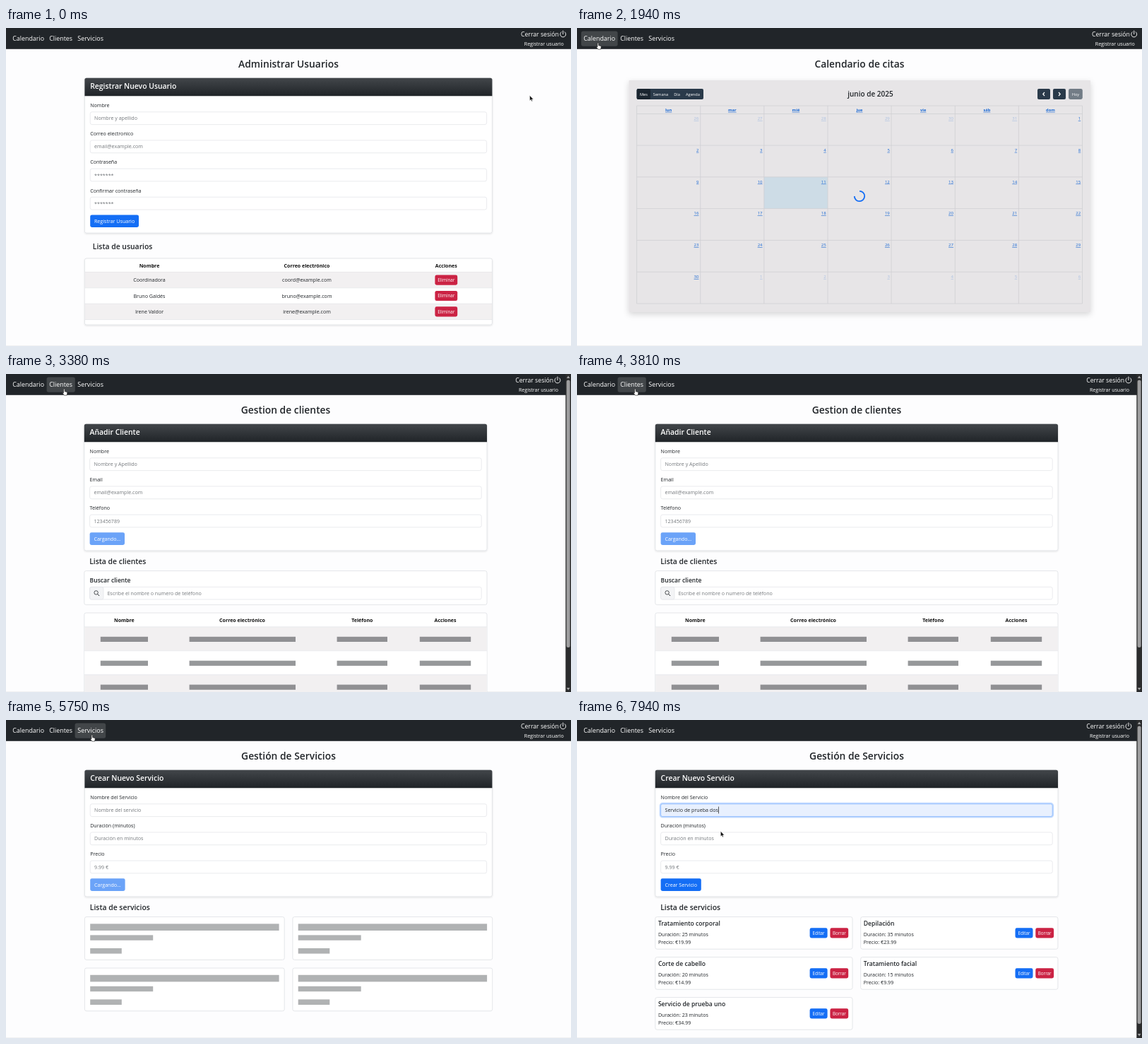
An HTML page that plays this animation: 800 px wide and 450 px high, repeating every 8 s.

```html
<!DOCTYPE html>
<html lang="es">
<head>
<meta charset="utf-8">
<style>
html, body { margin: 0; width: 100%; height: 100%; overflow: hidden; background: #fdfdfe; }
svg { display: block; }
text { font-family: "Open Sans", sans-serif; white-space: pre; }
</style>
</head>
<body>
<svg id="stage" width="800" height="450" viewBox="0 0 800 450"></svg>
<script>
const LOOP = 8000, INK = '#212529', BLUE = '#146ef5', RED = '#cb2344', GREY = '#75797d', LINE = '#dee0e4';
const BODY = 7.1, TITLE = 13.85, SECTION = 10.4;

// y is the middle of the capital letters
const text = (s, x, y, size = BODY, { fill = INK, weight = 400, anchor = 'start', more = '' } = {}) =>
  `<text x="${x}" y="${y + size * .36}" font-size="${size}" fill="${fill}" font-weight="${weight}" text-anchor="${anchor}" ${more}>${s}</text>`;
const rect = (x1, y1, x2, y2, fill, r = 0, more = '') =>
  `<rect x="${x1}" y="${y1}" width="${x2 - x1}" height="${y2 - y1}" rx="${r}" fill="${fill}" ${more}/>`;
const path = (d, stroke, width = 1, more = '') =>
  `<path d="${d}" fill="none" stroke="${stroke}" stroke-width="${width}" ${more}/>`;
const group = (id, body) => `<g id="${id}">${body}</g>`;
const heading = (s, x, y, size = SECTION, anchor = 'start') => text(s, x, y, size, { weight: 600, anchor });
const button = (s, x1, y1, x2, y2, fill, size = BODY) =>
  rect(x1, y1, x2, y2, fill, 2.4) + text(s, (x1 + x2) / 2, (y1 + y2) / 2, size, { fill: '#fff', anchor: 'middle' });
const card = (x1, y1, x2, y2, more = '') => rect(x1, y1, x2, y2, '#fff', 2.6, `stroke="${LINE}" stroke-width=".8" ${more}`);
const input = (x1, y1, x2, y2) => rect(x1, y1, x2, y2, '#fff', 2.6, 'stroke="#e1e3e7" stroke-width=".7"');
const columnHeads = (y, heads) => heads.map(([s, x]) => text(s, x, y, 7.05, { weight: 700, anchor: 'middle', fill: '#111' })).join('');

const edges = scroll => scroll ? [110.8, 681] : [111.4, 688.4];

function nav(scroll) {
  const dx = scroll ? -7.8 : 0, white = { fill: '#fff' };
  return text('Calendario', 9.2, 15, 8.9, white) + text('Clientes', 61.2, 15, 8.9, white) + text('Servicios', 101.2, 15, 9, white) +
    `<g transform="translate(${dx})">` + text('Cerrar sesión', 729, 8.4, 8.7, white) + text('Registrar usuario', 733.8, 22.7, 7.05, white) +
    path('M786.3 5.6a4 4 0 1 0 4.8 0M788.7 4V8.6', '#fff', .9, 'stroke-linecap="round"') + '</g>';
}

function scrollbar(end) {
  return rect(792.3, 0, 800, 450, '#2b2c2d') + rect(793.6, 8.5, 798.6, end, '#9e9e9f', 2.5) +
    '<path d="M793.8 6 796.1 2.4 798.4 6ZM793.8 444 796.1 447.6 798.4 444Z" fill="#a3a3a4"/>';
}

function form(title, head, fields, scroll) {
  const [left, right] = edges(scroll), x = left + 7.8;
  const bottom = 129.3 + fields.length * 40.2;
  return heading(title, (scroll ? 396 : 400), 51, TITLE, 'middle') +
    card(left, 70.8, right, bottom, 'filter="url(#soft)"') +
    `<path d="M${left} 96.2V73.4q0-2.6 2.6-2.6H${right - 2.6}q2.6 0 2.6 2.6V96.2Z" fill="url(#head)"/>` +
    text(head, x, 82.4, SECTION, { fill: '#fff', weight: 600 }) +
    fields.map(([label, hint], i) => {
      const y = 109.6 + i * 40.15;
      return text(label, x, y) + input(x, y + 9.2, right - 7.8, y + 27) +
        text(hint, x + 5.9, y + 18.1, BODY, { fill: GREY, more: i ? '' : 'class="hint"' });
    }).join('');
}

function usersPage() {
  const users = [['Coordinadora', 'coord@example.com'], ['Bruno Galdés', 'bruno@example.com'], ['Irene Valdor', 'irene@example.com']];
  const mid = { anchor: 'middle' };
  return nav() + form('Administrar Usuarios', 'Registrar Nuevo Usuario', [['Nombre', 'Nombre y apellido'],
      ['Correo electronico', 'email@example.com'], ['Contraseña', '*******'], ['Confirmar contraseña', '*******']]) +
    button('Registrar Usuario', 119.2, 264.4, 188, 282, BLUE) + heading('Lista de usuarios', 122.8, 309) +
    card(111.4, 326, 688.4, 420, 'filter="url(#soft)"') +
    columnHeads(336, [['Nombre', 203], ['Correo electrónico', 426], ['Acciones', 623.3]]) +
    users.map(([name, mail], i) => {
      const y = 345.4 + i * 22.4;
      return rect(111.8, y, 688, y + 22.4, i % 2 ? '#fff' : '#f2f0f1') + path(`M111.8 ${y}H688`, LINE, .6) +
        text(name, 203, y + 11.3, BODY, mid) + text(mail, 426, y + 11.3, BODY, mid) +
        button('Eliminar', 607.4, y + 4.1, 639.2, y + 18.3, RED, 6.3);
    }).join('') + path('M111.8 412.6H688', LINE, .6);
}

function calendarPage(loading) {
  const x0 = 84.6, step = 90.13, colX = c => x0 + c * step;
  const rows = loading ? [121.5, 166.1, 210.8, 255.6, 300.4, 345.2, 390] : [121.5, 166.8, 212.4, 258.6, 296, 352.6, 390];
  const line = loading ? '#d0d0d3' : '#e9e2e3', dark = '#2a3a4a';
  const link = { fill: '#1b69d3', anchor: 'end', more: 'text-decoration="underline"' };
  let out = nav() + heading('Calendario de citas', 400, 51, TITLE, 'middle') +
    rect(73.4, 74, 727, 402, loading ? '#e7e5e7' : '#fff', 1, 'filter="url(#lift)"') +
    rect(84.6, 86, 179, 101, dark, 2) + rect(84.6, 86, 104, 101, '#1a252f', 2) +
    [['Mes', 94.4], ['Semana', 118.5], ['Día', 141.5], ['Agenda', 164]].map(([s, x]) =>
      text(s, x, 93.6, 5.7, { fill: '#fff', anchor: 'middle' })).join('') +
    heading('junio de 2025', 415.4, 93.6, 10, 'middle') +
    rect(652, 86, 670, 101, dark, 2) + rect(674, 86, 692, 101, dark, 2) + button('Hoy', 696, 86, 715.8, 101, '#727c86', 5.7) +
    path('M662 91 659.8 93.5 662 96M682 91 684.2 93.5 682 96', '#fff', 1.2) +
    rect(colX(2), rows[2], colX(3), rows[3], loading ? '#cddce6' : '#e4eef7');
  const grid = [110, ...rows].map(y => `M${x0} ${y}H715.5`).join('') +
    Array.from({ length: 8 }, (_, c) => `M${colX(c)} 110V390`).join('');
  out += path(grid, line, .8);
  ['lun', 'mar', 'mié', 'jue', 'vie', 'sáb', 'dom'].forEach((d, c) =>
    out += text(d, colX(c + .5), 115.8, 5.7, { ...link, weight: 700, anchor: 'middle' }));
  for (let i = 0; i < 42; i++) {
    const day = i < 5 ? 26 + i + (i > 5) : i < 6 ? 31 : (i - 6) % 30 + 1;
    const other = i < 6 || i > 35;
    out += text(day, colX(i % 7 + 1) - 2.3, rows[i / 7 | 0] + 6.6, 6, { ...link, more: link.more + (other ? ' opacity=".3"' : '') });
  }
  if (loading) return out + path('M405.1 243.1A7.2 7.2 0 1 1 405.1 232.9', BLUE, 1.8, 'id="spinner"');
  const events = [
    [0, 4, '9:00', 'Corte de cabello', '17:00', 'Servicio de prueba uno'],
    [1, 0, '15:00', 'Tratamiento corporal', '18:00', 'Tratamiento facial, Corte de cabello'],
    [2, 1, '10:00', 'Tratamiento facial'],
    [2, 3, '11:00', 'Depilación', '13:00', 'Tratamiento corporal'],
    [3, 2, '12:00', 'Corte de cabello'], [3, 4, '10:00', 'Tratamiento corporal'],
    [4, 0, '10:15', 'Servicio de prueba uno', '16:00', 'Corte de cabello'],
    [5, 3, '13:00', 'Tratamiento facial']];
  for (const [row, col, ...items] of events)
    for (let i = 0; i < items.length; i += 2)
      out += `<svg x="${colX(col) + 1}" y="${rows[row] + 13.9 + i * 4.6}" width="88.2" height="8.8">` + rect(0, 0, 88.2, 8.8, BLUE, 1.4) +
        text(`<tspan font-weight="700">${items[i]}</tspan> ${items[i + 1]}`, 1, 4.4, 5, { fill: '#fff' }) + '</svg>';
  return out + text('+1 más', 87, 331.6, 5.2, { ...link, anchor: 'start' });
}

function clientsPage() {
  let bars = '', stripes = '';
  for (let i = 0; i < 3; i++) {
    const y = 357.8 + i * 33.9;
    stripes += rect(111.2, y, 680.6, y + 33.9, i % 2 ? '#fff' : '#f2f0f1') + path(`M111.2 ${y}H680.6`, LINE, .6);
    for (const [x1, x2] of [[133.8, 201], [259.6, 410], [468.6, 540], [585.8, 658.2]])
      bars += rect(x1, y + 14, x2, y + 21.2, INK);
  }
  return nav(true) + form('Gestion de clientes', 'Añadir Cliente',
      [['Nombre', 'Nombre y Apellido'], ['Email', 'email@example.com'], ['Teléfono', '123456789']], true) +
    button('Cargando...', 118.6, 224.2, 168, 242, '#6ba3f8') + heading('Lista de clientes', 118.2, 265) +
    card(110.8, 278.6, 681, 326.6) + heading('Buscar cliente', 118.6, 292, 8.55) +
    input(118.6, 301.4, 673.2, 319) + rect(118.6, 301.4, 138, 319, '#f3f4f6', 2.4, `stroke="${LINE}" stroke-width=".6"`) +
    '<circle cx="127.6" cy="309.4" r="2.7" fill="none" stroke="#212529" stroke-width=".8"/>' + path('M129.6 311.4 132.2 314', INK) +
    text('Escribe el nombre o numero de teléfono', 143.4, 310.3, BODY, { fill: GREY }) +
    card(110.8, 338, 681, 460) +
    columnHeads(348, [['Nombre', 167.3], ['Correo electrónico', 334.5], ['Teléfono', 504.3], ['Acciones', 622]]) +
    stripes + `<g class="glow">${bars}</g>` + scrollbar(387);
}

function servicesPage(loading) {
  const scroll = !loading, dx = loading ? 0 : -.6;
  let out = nav(scroll) + form('Gestión de Servicios', 'Crear Nuevo Servicio', [['Nombre del Servicio', 'Nombre del servicio'],
      ['Duración (minutos)', 'Duración en minutos'], ['Precio', '9.99 €']], scroll) +
    heading('Lista de servicios', 118.8 + dx, 265);
  if (loading) {
    let bars = '';
    for (let i = 0; i < 4; i++) {
      const x = 111.4 + i % 2 * 294.5, y = 278.6 + (i >> 1) * 72.4;
      out += card(x, y, x + 282.8, y + 60.8);
      bars += rect(x + 7.8, y + 9.8, x + 275.2, y + 19.4, INK) + rect(x + 7.8, y + 25.8, x + 96.8, y + 33.2, INK) +
        rect(x + 7.8, y + 44.4, x + 52.4, y + 52, INK);
    }
    return out + `<g class="glow">${bars}</g>` + button('Cargando...', 119.2, 224.2, 168.6, 242, '#6ba3f8');
  }
  const services = [['Tratamiento corporal', 25, '19.99'], ['Depilación', 35, '23.99'], ['Corte de cabello', 20, '14.99'],
    ['Tratamiento facial', 15, '9.99'], ['Servicio de prueba uno', 23, '34.99']];
  services.forEach(([name, minutes, price], i) => {
    const x = 110.8 + i % 2 * 290.9, y = 278.6 + (i >> 1) * 57;
    out += card(x, y, x + 279.2, y + 45.6) + heading(name, x + 4.1, y + 9.8, 8.6) +
      text(`Duración: ${minutes} minutos`, x + 4.1, y + 24.6) + text(`Precio: €${price}`, x + 4.1, y + 36) +
      button('Editar', x + 218.8, y + 15.7, x + 243.8, y + 29.8, BLUE, 6.25) +
      button('Borrar', x + 247.6, y + 15.7, x + 273.4, y + 29.8, RED, 6.25);
  });
  return out + button('Crear Servicio', 118.6, 224.2, 175.8, 242, BLUE) +
    group('focus', rect(118.6, 118.8, 673.2, 136.6, 'none', 2.6, 'stroke="#c2dafe" stroke-width="4"') +
      rect(118.6, 118.8, 673.2, 136.6, '#fff', 2.6, 'id="field" stroke="#86b7fe" stroke-width=".8"') +
      text('Nombre del servicio', 124.5, 127.7, BODY, { fill: GREY, more: 'id="hint"' }) +
      text('Servicio de prueba dos', 124.5, 127.7, BODY, { more: 'id="value"' }) +
      rect(0, 122.6, .7, 132.4, '#111', 0, 'id="caret"')) + scrollbar(430);
}

const pages = [
  ['users', 0, usersPage()], ['calendarLoading', 1700, calendarPage(true)], ['calendar', 2690, calendarPage(false)],
  ['clients', 3320, clientsPage()], ['servicesLoading', 5250, servicesPage(true)], ['services', 6200, servicesPage(false)]];
const pills = [[6, 57.6, 1560, 2840], [57.6, 97.8, 2840, 5120], [97.6, 141.2, 5120, 6450]];
const moves = [[1060, 741.6, 95.6], [1600, 30, 21.2], [2690, 30, 21.2], [2950, 82.6, 21.2], [5000, 82.6, 21.2],
  [5250, 122, 21.2], [6380, 122, 21.2], [6800, 206.8, 135.6], [7300, 206.8, 135.6], [7560, 203.4, 157.6]];
const cursors = [
  ['arrow', '<path d="M0 0V7.2L1.6 5.7 2.7 8.2 3.9 7.7 2.8 5.3H5.1Z" fill="#111" stroke="#fff" stroke-width=".4"/>'],
  ['hand', '<path d="M-1 .7a.8.8 0 0 1 1.6 0V3.5l2.8.7q.9.3.8 1.2L3.6 9H-.2L-2.4 5.9q0-1.1 1.4-.3Z" fill="#fff" stroke="#222" stroke-width=".6"/>'],
  ['beam', path('M-1.5-3.5H1.5M0-3.5V3.5M-1.5 3.5H1.5', '#333', .7)]];

const stage = document.getElementById('stage');
stage.innerHTML = `<defs>
  <linearGradient id="head" x2="0" y2="1"><stop stop-color="#42464a"/><stop offset="1" stop-color="#202428"/></linearGradient>
  <filter id="soft"><feDropShadow dx="0" dy="1" stdDeviation="1" flood-opacity=".12"/></filter>
  <filter id="lift"><feDropShadow dx="0" dy="3" stdDeviation="4" flood-opacity=".16"/></filter></defs>` +
  rect(0, 0, 800, 450, '#fdfdfe') + rect(0, 449, 800, 450, '#f1f1f2') + rect(0, 0, 800, 29.8, INK) +
  pills.map(([x1, x2], i) => rect(x1, 4.4, x2, 25.8, '#424649', 2.8, `id="pill${i}"`)).join('') +
  pages.map(([id, , body]) => group(id, body)).join('') +
  group('cursor', cursors.map(([id, body]) => group(id, body)).join(''));

const el = id => document.getElementById(id);
const show = (id, on) => el(id).style.display = on ? '' : 'none';
const glows = [...document.querySelectorAll('.glow')];

function pointer(t) {
  const next = moves.findIndex(m => m[0] > t);
  if (next < 1) return (next ? moves[moves.length - 1] : moves[0]).slice(1);
  const [t0, x0, y0] = moves[next - 1], [t1, x1, y1] = moves[next];
  const k = (t - t0) / (t1 - t0), e = k * k * (3 - 2 * k);
  return [x0 + (x1 - x0) * e, y0 + (y1 - y0) * e];
}

function draw(t) {
  pages.forEach(([id, start], i) => show(id, t >= start && t < (pages[i + 1]?.[1] ?? LOOP)));
  pills.forEach(([, , from, to], i) => show('pill' + i, t >= from && t < to));
  const [x, y] = pointer(t);
  el('cursor').setAttribute('transform', `translate(${x} ${y})`);
  const shape = t >= 1560 && t < 6450 ? 'hand' : t >= 6740 && t < 7480 ? 'beam' : 'arrow';
  cursors.forEach(([id]) => show(id, id === shape));
  el('spinner').setAttribute('transform', `rotate(${225 + (t - 1940) * .48} 400 238)`);
  glows.forEach((g, i) => g.setAttribute('opacity', .35 + .15 * Math.cos((t - [3598, 5250][i]) * Math.PI / 1000)));

  const filled = t >= 7650;
  show('focus', t >= 6850);
  show('hint', !filled);
  show('value', filled);
  el('field').setAttribute('fill', filled ? '#e8f0fe' : '#fff');
  el('caret').setAttribute('x', filled ? 200.2 : 124.6);
  show('caret', (t - (filled ? 7650 : 6850)) % 1060 < 530);
}

const begin = performance.now();
function tick() {
  draw((performance.now() - begin) % LOOP);
  requestAnimationFrame(tick);
}
tick();
</script>
</body>
</html>
```
